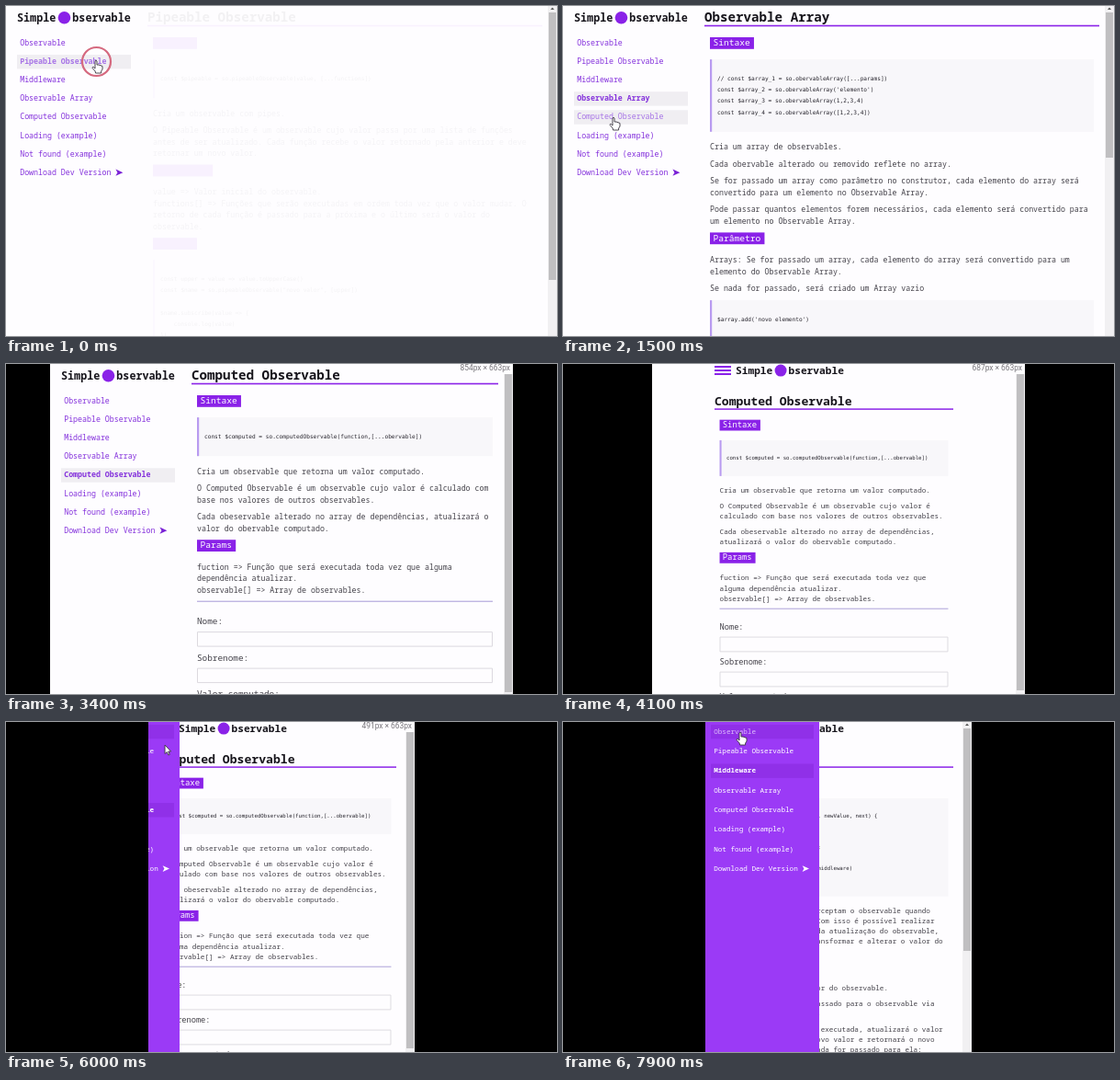
Recreate the animation shown at these times as an HTML page with a canvas. Size 600x359 px, loop 8000 ms.

```html
<!DOCTYPE html>
<html lang="pt">
<head>
<meta charset="utf-8">
<title>Simple Observable</title>
<style>
html, body { margin: 0; width: 100%; height: 100%; overflow: hidden; background: #000; }
canvas { display: block; }
</style>
</head>
<body>
<canvas id="stage" width="600" height="359"></canvas>
<script>
const ctx = document.getElementById('stage').getContext('2d');
const LOOP = 8000, W = 600, H = 359;
const PAPER = '#fefdff', PURPLE = '#8a22e8', INK = '#44424a', DRAWER = '#9b3af6';
const MONO = '"Noto Sans Mono", "DejaVu Sans Mono", monospace';
const CODE = '"DejaVu Sans Mono", monospace';
const CHAR = 4.96, BODY = 8.27;

// Page scale, line height and input height of the two layouts.
const WIDE = { scale: 1, line: 12.4, box: 16 };
const NARROW = { scale: 0.925, line: 12.15, box: 17.6 };

const LINKS = ['Observable', 'Pipeable Observable', 'Middleware', 'Observable Array',
  'Computed Observable', 'Loading (example)', 'Not found (example)', 'Download Dev Version'];

// Each page: menu index, scrollbar end (wide, narrow) and its content blocks.
const PAGES = {
  pipeable: { link: 1, thumb: [298, 298], blocks: [
    ['badge', 'Sintaxe'],
    ['code', 'const $pipeable = so.pipeableObservable(value, [...functions])'],
    ['p', 'Cria um observable com pipes.'],
    ['p', 'O Pipeable Observable é um observable cujo valor passa por uma lista de funções antes de ser atualizado. Cada função recebe o valor retornado pela anterior e deve retornar um novo valor.'],
    ['badge', 'Parâmetros'],
    ['p', 'value => Valor inicial do observable.\nfunctions[] => Funções que serão executadas em ordem toda vez que o valor mudar. O retorno de cada função é passado para a próxima e o último será o valor do observable.'],
    ['badge', 'Exemplo'],
    ['code', 'const upper = value => value.toUpperCase()\nconst $name = so.pipeableObservable("novo valor", [upper])\n\n$name.subscribe(value => {\n    console.log(value)\n})\n']
  ] },
  middleware: { link: 2, thumb: [260, 249], blocks: [
    ['badge', 'Sintaxe'],
    ['code', 'function middleware(prevValue, newValue, next) {\n    // valida o valor\n\n    return next(newValue + 1);\n}\n$pipeableObservable.register(middleware)\n'],
    ['p', 'Funções middleware interceptam o observable quando alguém altera o valor. Com isso é possível realizar alguma validação antes da atualização do observable, além de podermos até transformar e alterar o valor do observable.'],
    ['badge', 'Params'],
    ['p', 'newValue => Um novo valor do observable.'],
    ['p', 'next => Valor que foi passado para o observable via função (next(novoValor))'],
    ['p', 'Se esta função next for executada, atualizará o valor do observable para um novo valor e retornará o novo valor trocado. Quando nada for passado para ela:']
  ] },
  array: { link: 3, thumb: [165, 165], blocks: [
    ['badge', 'Sintaxe'],
    ['code', "// const $array_1 = so.obervableArray([...params])\nconst $array_2 = so.obervableArray('elemento')\nconst $array_3 = so.obervableArray(1,2,3,4)\nconst $array_4 = so.obervableArray([1,2,3,4])"],
    ['p', 'Cria um array de observables.'],
    ['p', 'Cada obervable alterado ou removido reflete no array.'],
    ['p', 'Se for passado um array como parâmetro no construtor, cada elemento do array será convertido para um elemento no Observable Array.'],
    ['p', 'Pode passar quantos elementos forem necessários, cada elemento será convertido para um elemento no Observable Array.'],
    ['badge', 'Parâmetro'],
    ['p', 'Arrays: Se for passado um array, cada elemento do array será convertido para um elemento do Observable Array.'],
    ['p', 'Se nada for passado, será criado um Array vazio'],
    ['code', "$array.add('novo elemento')\n\n"]
  ] },
  computed: { link: 4, thumb: [357, 355], blocks: [
    ['badge', 'Sintaxe'],
    ['code', 'const $computed = so.computedObservable(function,[...obervable])'],
    ['p', 'Cria um observable que retorna um valor computado.'],
    ['p', 'O Computed Observable é um observable cujo valor é calculado com base nos valores de outros observables.'],
    ['p', 'Cada obeservable alterado no array de dependências, atualizará o valor do obervable computado.'],
    ['badge', 'Params'],
    ['p', 'fuction => Função que será executada toda vez que alguma dependência atualizar.\nobservable[] => Array de observables.'],
    ['hr'],
    ['field', 'Nome:'],
    ['field', 'Sobrenome:'],
    ['output', 'Valor computado:']
  ] }
};

const VISITS = [[-20, 'pipeable'], [500, 'middleware'], [1100, 'array'], [1700, 'computed'], [6900, 'middleware']];
const EDGE = [[2820, 0], [3600, 64], [4100, 97], [4500, 127], [5100, 145.7], [5400, 155]];
const POINTER = [[200, 98, 60], [450, 60, 81], [650, 60, 81], [950, 58, 101], [1200, 58, 101],
  [1500, 55, 122], [1850, 55, 122], [2650, 570, 200], [5500, 345, 150], [5800, 174, 7],
  [5950, 174, 9], [6000, 173, 25], [6500, 195, 40], [6800, 195, 53], [7200, 195, 53], [7900, 193, 12]];

const clamp = v => Math.max(0, Math.min(1, v));

// Interpolates the values of [time, ...values] keys.
function at(keys, t) {
  const i = keys.findIndex(k => k[0] > t);
  if (i === 0) return keys[0].slice(1);
  if (i < 0) return keys[keys.length - 1].slice(1);
  const a = keys[i - 1], b = keys[i], f = (t - a[0]) / (b[0] - a[0]);
  return a.slice(1).map((v, n) => v + (b[n + 1] - v) * f);
}

function rect(x, y, w, h, color) {
  ctx.fillStyle = color;
  ctx.fillRect(x, y, w, h);
}

function text(str, x, mid, size, color, weight = 400, family = MONO) {
  ctx.font = `${weight} ${size}px ${family}`;
  ctx.fillStyle = color;
  ctx.fillText(str, x, mid + size * 0.31);
}

function shape(points, x, y, fill, stroke) {
  ctx.beginPath();
  points.forEach(([px, py]) => ctx.lineTo(x + px, y + py));
  ctx.closePath();
  ctx.fillStyle = fill;
  ctx.fill();
  if (stroke) {
    ctx.strokeStyle = stroke;
    ctx.lineWidth = 0.9;
    ctx.lineJoin = 'round';
    ctx.stroke();
  }
}

function wrap(str, cols) {
  const rows = [];
  for (const part of str.split('\n')) {
    let row = '';
    for (const word of part.split(' ')) {
      if (row && row.length + 1 + word.length > cols) {
        rows.push(row);
        row = word;
      } else row += (row && ' ') + word;
    }
    rows.push(row);
  }
  return rows;
}

// Block painters draw at y and return the next y.
const paint = {
  badge(str, y) {
    rect(6, y - 0.3, str.length * 5.75 + 7.7, 12.8, PURPLE);
    text(str, 9.5, y + 6, 9.58, '#fff');
    return y + 23.8;
  },
  code(str, y, w) {
    const rows = str.split('\n'), h = 29.9 + 12.2 * rows.length;
    rect(6, y, w, h, '#f8f7fa');
    rect(6, y, 2.2, h, '#b99bf0');
    rows.forEach((row, i) => text(row, 14, y + 20.6 + i * 12.3, 6.17, '#26242c', 400, CODE));
    return y + h + 10.7;
  },
  p(str, y, w, { line }) {
    const rows = wrap(str, Math.floor(w / CHAR));
    rows.forEach((row, i) => text(row, 6, y + 6.2 + i * line, BODY, INK));
    return y + rows.length * line + 6.2;
  },
  hr(str, y, w) {
    rect(6, y - 1, w, 1, '#a79ad6');
    return y + 15.4;
  },
  field(str, y, w, { box }) {
    text(str, 6, y + 6.2, 9.37, INK);
    ctx.strokeStyle = '#dcd9df';
    ctx.lineWidth = 1;
    ctx.strokeRect(6.5, y + 17.5, w - 1, box - 0.5);
    return y + 23.5 + box;
  },
  output(str, y, w) {
    rect(6, y + 11.5, w, 18, '#eeecf0');
    text(str, 6, y + 6.2, 9.37, INK);
    return y + 39.5;
  }
};

function article(page, x, y, pixels, layout, alpha) {
  const width = pixels / layout.scale;
  ctx.save();
  ctx.translate(x, y);
  ctx.scale(layout.scale, layout.scale);
  ctx.globalAlpha = alpha;
  text(LINKS[page.link], 0, 12.8, 14.2, '#17151c', 700);
  rect(0, 20.7, width, 1.6, PURPLE);
  let top = 34.3;
  for (const [kind, str] of page.blocks) top = paint[kind](str, top, width - 12, layout);
  ctx.restore();
}

function brand(x, y, size) {
  text('Simple', x, y, size, '#17151c', 700);
  text('bservable', x + size * 5.13, y, size, '#17151c', 700);
  ctx.beginPath();
  ctx.arc(x + size * 4.38, y - 0.5, size * 0.58, 0, 7);
  ctx.fillStyle = PURPLE;
  ctx.fill();
}

function menu(x, y, pitch, size, width, active, hover, dark) {
  LINKS.forEach((name, i) => {
    const mid = y + i * pitch, on = i === active, over = i === hover;
    if (on || over) rect(x, mid - 7.6, width, 15.4, dark ? '#9030e8' : '#f0eef2');
    const color = dark ? (over ? '#dcbcfb' : '#fff') : over ? '#a673e6' : '#8431dc';
    text(name, x + 3.2, mid, size, color, on ? 700 : 400);
    if (i === 7) {
      const k = size / BODY;
      shape([[0, -3.6 * k], [8 * k, 0], [0, 3.6 * k], [2 * k, 0]], x + 3.2 + size * 12.6, mid, dark ? '#fff' : '#7a22d6');
    }
  });
}

function scrollbar(right, end) {
  rect(right - 10, 0, 10, H, '#f1f0f2');
  rect(right - 9, 7, 8, end - 7, '#c0bfc1');
  shape([[-2, 1], [2, 1], [0, -1.5]], right - 5, 3, '#555');
}

function cursor(x, y, hand) {
  const points = hand
    ? [[-1, 0], [0, -0.8], [1, 0], [1, 4], [3, 4], [5, 4.7], [7, 5.5], [7, 9], [5.6, 11], [5.6, 13], [-0.5, 13],
      [-0.8, 11], [-3.8, 7.6], [-3.6, 6.4], [-2.6, 6.4], [-1, 8]]
    : [[0, 0], [0, 9.5], [2.2, 7.6], [3.8, 11], [5.2, 10.4], [3.7, 7], [6.6, 7]];
  shape(points, x, y, '#fff', '#3a3640');
}

function ring(x, y) {
  ctx.beginPath();
  ctx.arc(x + 0.5, y + 0.5, 15.5, 0, 7);
  ctx.strokeStyle = '#d5697f';
  ctx.lineWidth = 2.2;
  ctx.stroke();
}

function draw(t) {
  const [start, name] = VISITS.filter(v => v[0] <= t).pop();
  const page = PAGES[name], alpha = clamp((t - start) / 400);
  const [edge] = at(EDGE, t), left = Math.round(edge), right = W - left, narrow = left > 73;
  const [px, py] = at(POINTER, t);
  const drawer = clamp((t - 5905) / 350);
  const pointing = t < 1900 || t >= 5950;
  const hover = pointing ? Math.floor((py + 6 - (narrow ? 10.5 : 40.5)) / (narrow ? 21.3 : 20.1)) : -1;

  rect(0, 0, W, H, PAPER);
  if (narrow) {
    article(page, 165, 29.2, 260, NARROW, alpha);
    [2, 6, 10].forEach(y => rect(165, y, 18, 2, PURPLE));
    brand(188, 7.6, 11.2);
  } else {
    article(page, left + 154, 0, 430 - 2 * left, WIDE, alpha);
    brand(left + 12, 13.2, 11.75);
    menu(left + 12, 40.5, 20.1, BODY, 124, page.link, hover, false);
  }
  scrollbar(right, page.thumb[+narrow]);

  if (drawer) {
    const x = left - 124 * (1 - drawer);
    rect(x, 0, 124, H, DRAWER);
    menu(x + 6, 10.5, 21.3, BODY * NARROW.scale, 112, page.link, hover, true);
  }
  if (t > 2820 && t < 6500) {
    rect(right - 64, 0, 64, 11, PAPER);
    ctx.textAlign = 'right';
    text(`${Math.round((W - 2 * edge) * 1.692)}px × 663px`, right - 3, 4.7, 8.4, '#77757a', 400, 'Roboto, sans-serif');
    ctx.textAlign = 'left';
  }
  rect(0, 0, left, H, '#000');
  rect(right, 0, left, H, '#000');

  if (VISITS.some(([time]) => t >= time - 80 && t < time + 200)) ring(px, py);
  if (t < 2650 || t >= 5500) cursor(px, py, t < 1900 || t > 6150);
}

function frame(now) {
  draw(now % LOOP);
  requestAnimationFrame(frame);
}
requestAnimationFrame(frame);
</script>
</body>
</html>
```
